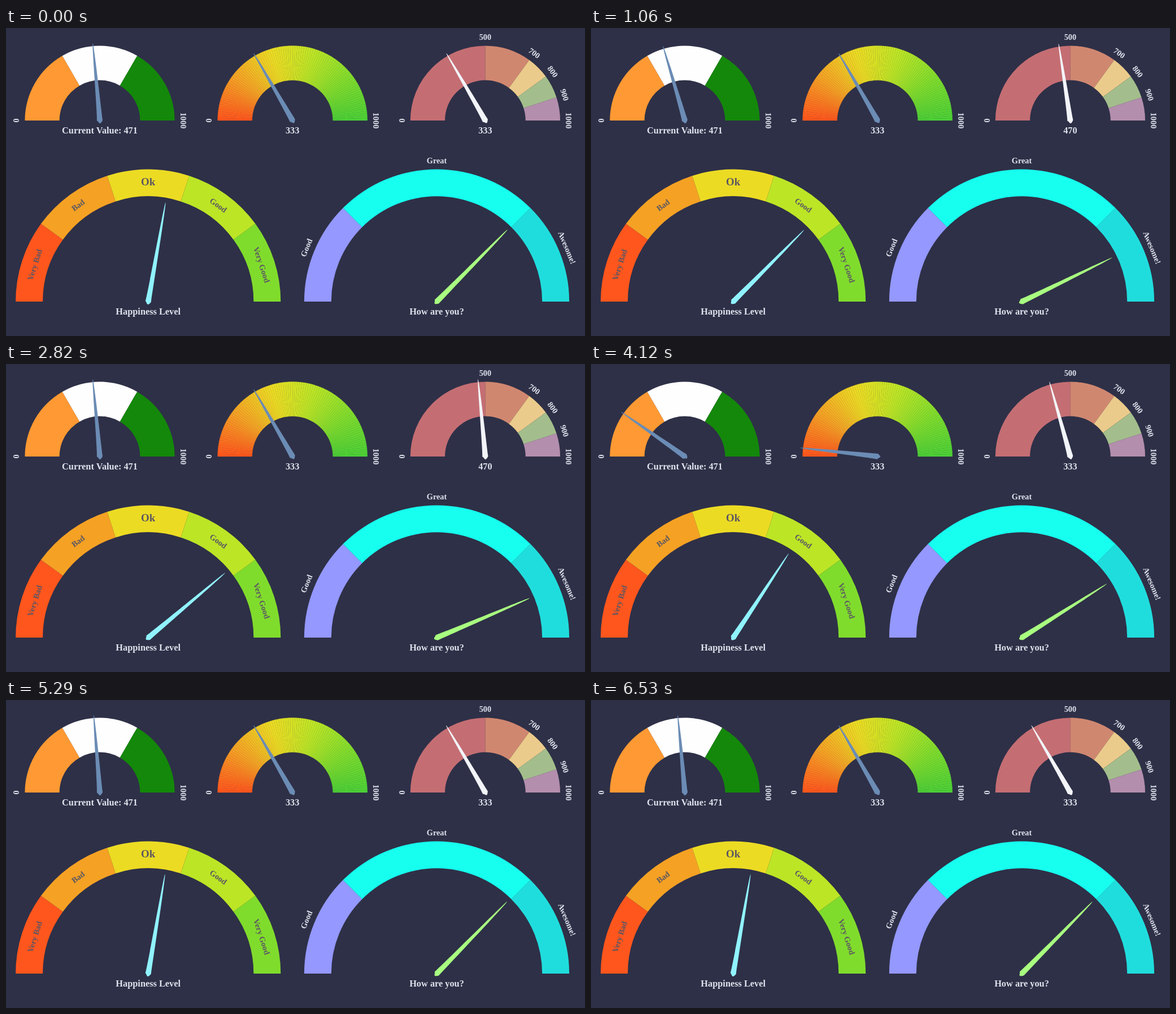
An HTML page that plays this animation: 1025x546 px, repeating every 8.24 s.

```html
<!DOCTYPE html>
<html lang="en">
<head>
<meta charset="utf-8">
<title>Gauges</title>
<style>
html, body { margin: 0; width: 100%; height: 100%; overflow: hidden; background: #2e3047; }
svg { display: block; width: 100%; height: 100%; }
text { font: bold 14px "Liberation Serif", "Times New Roman", serif; text-anchor: middle; fill: #dee2ec; }
.inside { fill: #5b5663; }
.value { font-size: 16px; }
</style>
</head>
<body>
<svg id="stage" viewBox="0 0 1025 546"></svg>
<script>
const SCALE = 1.02;
const LOOP = 8240;
const FRAME = 58.8;
const ELASTIC_MS = 2470;
const QUAD_MS = 372;

// Each swing: first visible frame, last frame index, real start of the easing.
const SWINGS = [
  { shown: 410, frames: 41, start: 349 },
  { shown: 4060, frames: 42, start: 4033 },
];

const RAMP = ['#ff561d', '#f5a124', '#ecdb23', '#bce526', '#80dc2c', '#4ccf36'];
const stage = document.getElementById('stage');

function add(parent, tag, attrs, text) {
  const node = document.createElementNS('http://www.w3.org/2000/svg', tag);
  for (const key in attrs) node.setAttribute(key, attrs[key]);
  if (text !== undefined) node.textContent = text;
  parent.appendChild(node);
  return node;
}

const toAngle = share => share * 180 - 90;

function polar(radius, angle) {
  const a = angle * Math.PI / 180;
  return `${(radius * Math.sin(a)).toFixed(3)},${(-radius * Math.cos(a)).toFixed(3)}`;
}

function ring(inner, outer, from, to) {
  const a = toAngle(from), b = toAngle(to);
  return `M${polar(outer, a)}A${outer},${outer} 0 0 1 ${polar(outer, b)}` +
    `L${polar(inner, b)}A${inner},${inner} 0 0 0 ${polar(inner, a)}Z`;
}

function needlePath(length) {
  const third = 5 / 3;
  return `M5,0C${2 * third},${-length / 2} ${third},${-length} 0,${-length}` +
    `C${-third},${-length} ${-2 * third},0 -5,0` +
    `C${-2 * third},0 ${-third},5 0,5C${third},5 ${2 * third},2.5 5,0Z`;
}

function rampColor(share) {
  const pos = Math.min(share, 0.9999) * (RAMP.length - 1);
  const i = Math.floor(pos);
  const channel = (hex, c) => parseInt(hex.substr(1 + 2 * c, 2), 16);
  const mix = c => Math.round(channel(RAMP[i], c) + (channel(RAMP[i + 1], c) - channel(RAMP[i], c)) * (pos - i));
  return `rgb(${mix(0)},${mix(1)},${mix(2)})`;
}

// stops: segment borders from 0 to 1; labels: [share, text, radius, extra attributes]
function gauge({ x, y, size, band, reach, stops, colors, seam = 0, labels, caption, needle }) {
  const root = add(stage, 'g', { transform: `translate(${x} ${y}) scale(${SCALE})` });
  const outer = size - 20;
  colors.forEach((fill, i) => add(root, 'path', {
    d: ring(outer - band, outer, stops[i], stops[i + 1]), fill, stroke: fill, 'stroke-width': seam,
  }));
  for (const [share, text, radius = size - 10, extra] of labels) {
    add(root, 'text', { transform: `rotate(${toAngle(share)}) translate(0 ${-radius})`, ...extra }, text);
  }
  const value = add(root, 'text', { class: 'value', y: 23 }, caption);
  const pointer = add(root, 'path', { d: needlePath(size * reach), fill: needle });
  return {
    caption: text => { if (value.textContent !== text) value.textContent = text; },
    turn: share => pointer.setAttribute('transform', `rotate(${toAngle(share)})`),
  };
}

const even = n => Array.from({ length: n + 1 }, (_, i) => i / n);
const ends = [[0, '0'], [1, '1000']];
const small = { y: 164, size: 150, band: 60, reach: 0.9 };
const large = { y: 485, size: 250, band: 47, reach: 0.7 };
const inside = (share, text, size = 14) =>
  [share, text, 202.3, { class: 'inside', style: `font-size:${size}px` }];

const flag = gauge({
  ...small, x: 166, stops: even(3), colors: ['#ff9933', '#fefefe', '#14880a'],
  labels: ends, caption: 'Current Value: 471', needle: '#6b8cb5',
});
const blend = gauge({
  ...small, x: 507.2, stops: even(100), colors: even(99).map(rampColor), seam: 0.2,
  labels: ends, caption: '333', needle: '#6b8cb5',
});
const custom = gauge({
  ...small, x: 848.4, stops: [0, 0.5, 0.7, 0.8, 0.9, 1],
  colors: ['#c46e73', '#d08770', '#ebcb8b', '#a3be8c', '#b48ead'],
  labels: [...ends, [0.5, '500'], [0.7, '700'], [0.8, '800'], [0.9, '900']],
  caption: '333', needle: '#f2f4f9',
});
const mood = gauge({
  ...large, x: 251.7, stops: even(5), colors: RAMP.slice(0, 5),
  labels: [inside(0.1, 'Very Bad'), inside(0.3, 'Bad'), inside(0.5, 'Ok', 18.5),
    inside(0.7, 'Good'), inside(0.9, 'Very Good')],
  caption: 'Happiness Level', needle: '#90f3ff',
});
const greeting = gauge({
  ...large, x: 762.5, stops: [0, 0.25, 0.75, 1], colors: ['#9498ff', '#17ffee', '#20dddd'],
  labels: [[0.125, 'Good'], [0.5, 'Great'], [0.875, 'Awesome!']],
  caption: 'How are you?', needle: '#a8ff80',
});

function elasticOut(t) {
  if (t >= 1) return 1;
  const decay = (2 ** (-10 * t) - 2 ** -10) * 1.0009775;
  return 1 - decay * Math.cos(t * 2 * Math.PI / 0.3);
}

function quadInOut(t) {
  if (t >= 1) return 1;
  return t < 0.5 ? 2 * t * t : 1 - 2 * (1 - t) ** 2;
}

function draw(time) {
  const forward = time >= SWINGS[0].shown && time < SWINGS[1].shown;
  let elastic = 1, quad = 1;
  const swing = SWINGS.filter(s => time >= s.shown).pop();
  if (swing) {
    const frame = Math.floor((time - swing.shown) / FRAME + 0.15);
    if (frame < swing.frames) {
      const elapsed = swing.shown + frame * FRAME - swing.start;
      elastic = elasticOut(elapsed / ELASTIC_MS);
      quad = quadInOut(elapsed / QUAD_MS);
    }
  }
  const between = (low, high) => forward ? low + (high - low) * elastic : high + (low - high) * elastic;
  flag.turn(0.471 * elastic);
  blend.turn(0.333 * quad);
  custom.turn(between(0.333, 0.47));
  custom.caption(forward ? '470' : '333');
  mood.turn(between(0.555, 0.777));
  greeting.turn(between(0.747, 0.872));
}

const begin = performance.now();
function tick() {
  draw((performance.now() - begin) % LOOP);
  requestAnimationFrame(tick);
}
tick();
</script>
</body>
</html>
```
